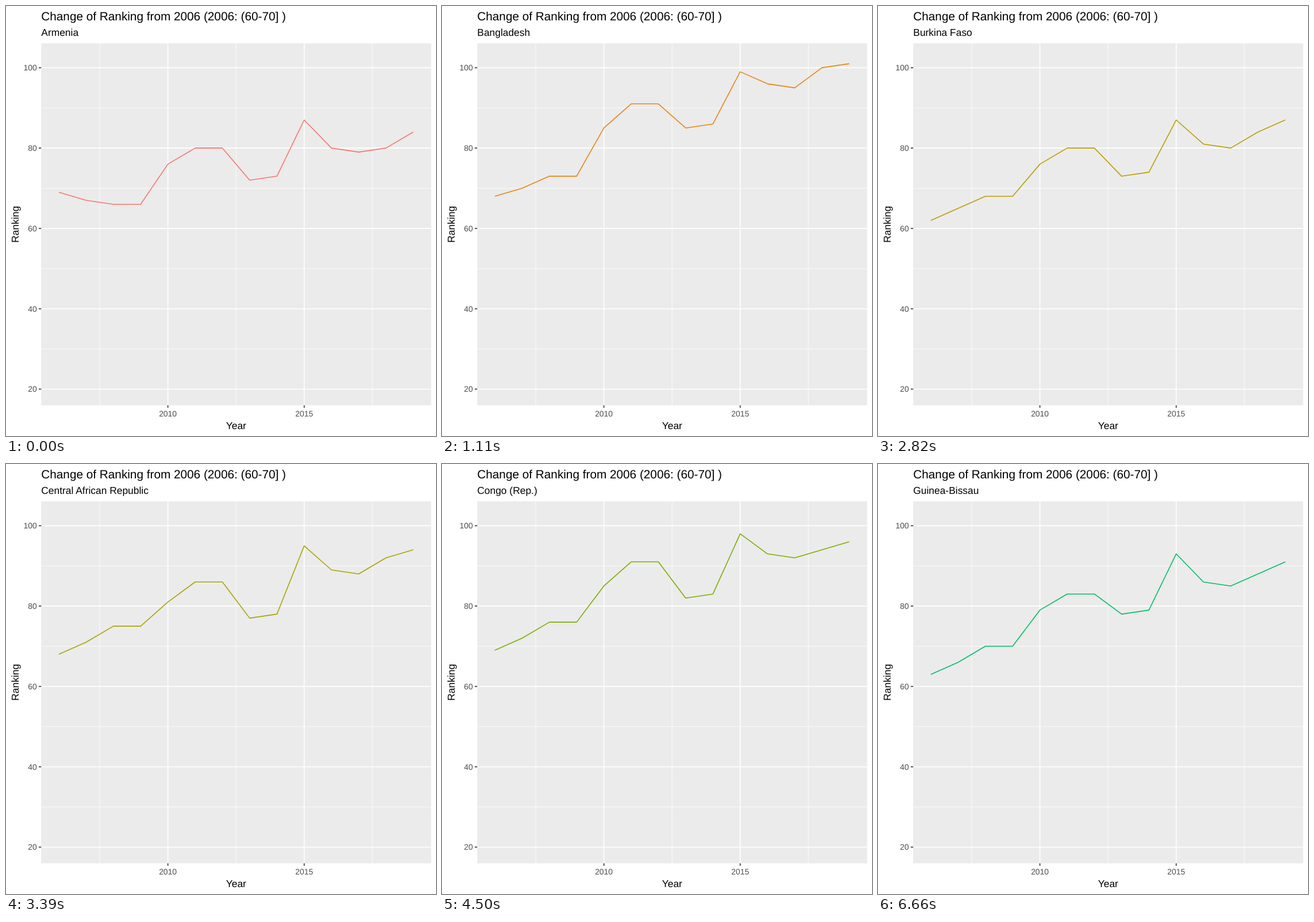
An HTML page that plays this animation: 748 px wide and 748 px high, repeating every 6.75 s.

```html
<!DOCTYPE html>
<html lang="en">
<head>
<meta charset="utf-8">
<style>
  html, body { margin: 0; height: 100%; overflow: hidden; background: #fff; }
  svg { display: block; width: 100vw; height: 100vh; }
  text {
    font-family: "Liberation Sans", Arial, sans-serif; font-size: 17.4px;
    text-rendering: geometricPrecision;
  }
  .title { font-size: 20.75px; }
  .tick text { font-size: 13.9px; fill: #4d4d4d; }
  .tick path { stroke: #333; stroke-width: 1.6; }
</style>
</head>
<body>
<svg viewBox="0 0 748 748">
  <text class="title" x="61.3" y="25">Change of Ranking from 2006 (2006: (60-70] )</text>
  <text id="country" x="61.3" y="52.3"></text>
  <rect x="61.3" y="65" width="678.2" height="629.6" fill="#ebebeb"/>
  <g id="grid" stroke="#fff"></g>
  <path id="line" fill="none" stroke-width="1.6" stroke-linejoin="round"/>
  <g id="axes" class="tick"></g>
  <text x="400.3" y="735.5" text-anchor="middle">Year</text>
  <text transform="translate(22.2 379.8) rotate(-90)" text-anchor="middle">Ranking</text>
</svg>
<script>
const LOOP = 6750, HUES = 32;

// Key ranks: 2006, 2009, 2010, 2011, 2013, 2015, 2016, 2018, 2019
const series = {
  "Armenia": [69, 66, 76, 80, 72, 87, 80, 80, 84],
  "Azerbaijan": typical(69, 87, 76),
  "Bangladesh": [68, 73, 85, 91, 85, 99, 96, 100, 101],
  "Belarus": typical(63, 79, 69),
  "Benin": typical(61, 85, 83),
  "Burkina Faso": [62, 68, 76, 80, 73, 87, 81, 84, 87],
  "Central African Republic": [68, 75, 81, 86, 77, 95, 89, 92, 94],
  "Colombia": typical(65, 75, 46),
  "Congo (Rep.)": [69, 76, 85, 91, 82, 98, 93, 94, 96],
  "Cuba": typical(66, 84, 81),
  "Georgia": [68, 66, 72, 73, 67, 79, 71, 50, 52],
  "Guinea": typical(60, 91, 90),
  "Guinea-Bissau": [63, 70, 79, 83, 78, 93, 86, 88, 91],
};
const names = Object.keys(series);

// The common course: climb, dip in 2013, peak in 2015, fall back
function typical(first, peak, last) {
  const climb = f => Math.round(first + f * (peak - first));
  return [first, climb(0.25), climb(0.55), climb(0.75), climb(0.45), peak, last - 3, last - 2, last];
}

// Key ranks to one rank per year
const yearly = ([a, b, c, d, e, f, g, h, i]) =>
  [a, Math.floor((a + b) / 2), b, b, c, d, d, e, e + 1, f, g, g - 1, h, i];

const $ = id => document.getElementById(id);
const X = year => 281.6 + (year - 2010) * 47.42;
const Y = rank => 107.4 + (100 - rank) * 6.988;

// Evenly spaced hues at luminance 65 and chroma 100 (polar LUV)
function hue(i) {
  const h = (15 + 360 * i / HUES) * Math.PI / 180, L = 65, C = 100;
  const y = ((L + 16) / 116) ** 3;
  const u = C * Math.cos(h) / (13 * L) + 0.1978;
  const v = C * Math.sin(h) / (13 * L) + 0.4683;
  const x = y * 9 * u / (4 * v), z = 3 * y / v - 5 * y - x / 3;
  const rgb = [
    3.2405 * x - 1.5371 * y - 0.4985 * z,
    -0.9693 * x + 1.876 * y + 0.0416 * z,
    0.0556 * x - 0.204 * y + 1.0572 * z,
  ].map(c => {
    c = Math.max(0, Math.min(1, c));
    return Math.round(255 * (c > 0.0031 ? 1.055 * c ** (1 / 2.4) - 0.055 : 12.92 * c));
  });
  return `rgb(${rgb})`;
}

function drawPanel() {
  let minor = "", major = "", axes = "";
  const vLine = (year, w) => `<path d="M${X(year)} 65V694.6" stroke-width="${w}"/>`;
  const hLine = (rank, w) => `<path d="M61.3 ${Y(rank)}H739.5" stroke-width="${w}"/>`;
  for (let r = 20; r <= 100; r += 20) {
    if (r < 100) minor += hLine(r + 10, 0.8);
    major += hLine(r, 1.6);
    axes += `<path d="M61.3 ${Y(r)}h-4.3"/>
      <text x="53.7" y="${Y(r) + 5}" text-anchor="end">${r}</text>`;
  }
  for (let y = 2007.5; y < 2019; y += 5) minor += vLine(y, 0.8);
  for (const y of [2010, 2015]) {
    major += vLine(y, 1.6);
    axes += `<path d="M${X(y)} 694.6v4.3"/>
      <text x="${X(y)}" y="713.8" text-anchor="middle">${y}</text>`;
  }
  $("grid").innerHTML = minor + major;
  $("axes").innerHTML = axes;
}

function show(i) {
  const points = yearly(series[names[i]]).map((rank, k) => `${X(2006 + k)} ${Y(rank)}`);
  $("country").textContent = names[i];
  $("line").setAttribute("stroke", hue(i));
  $("line").setAttribute("d", "M" + points.join("L"));
}

// Start of slide i: 540 ms each, six early ones 30 ms longer
const begins = i => i && 540 * i + 30 * Math.min(i - 1, 6);

const start = performance.now();
function tick() {
  const t = (performance.now() - start) % LOOP;
  show(names.findLastIndex((_, i) => begins(i) <= t));
  requestAnimationFrame(tick);
}
drawPanel();
tick();
</script>
</body>
</html>
```
